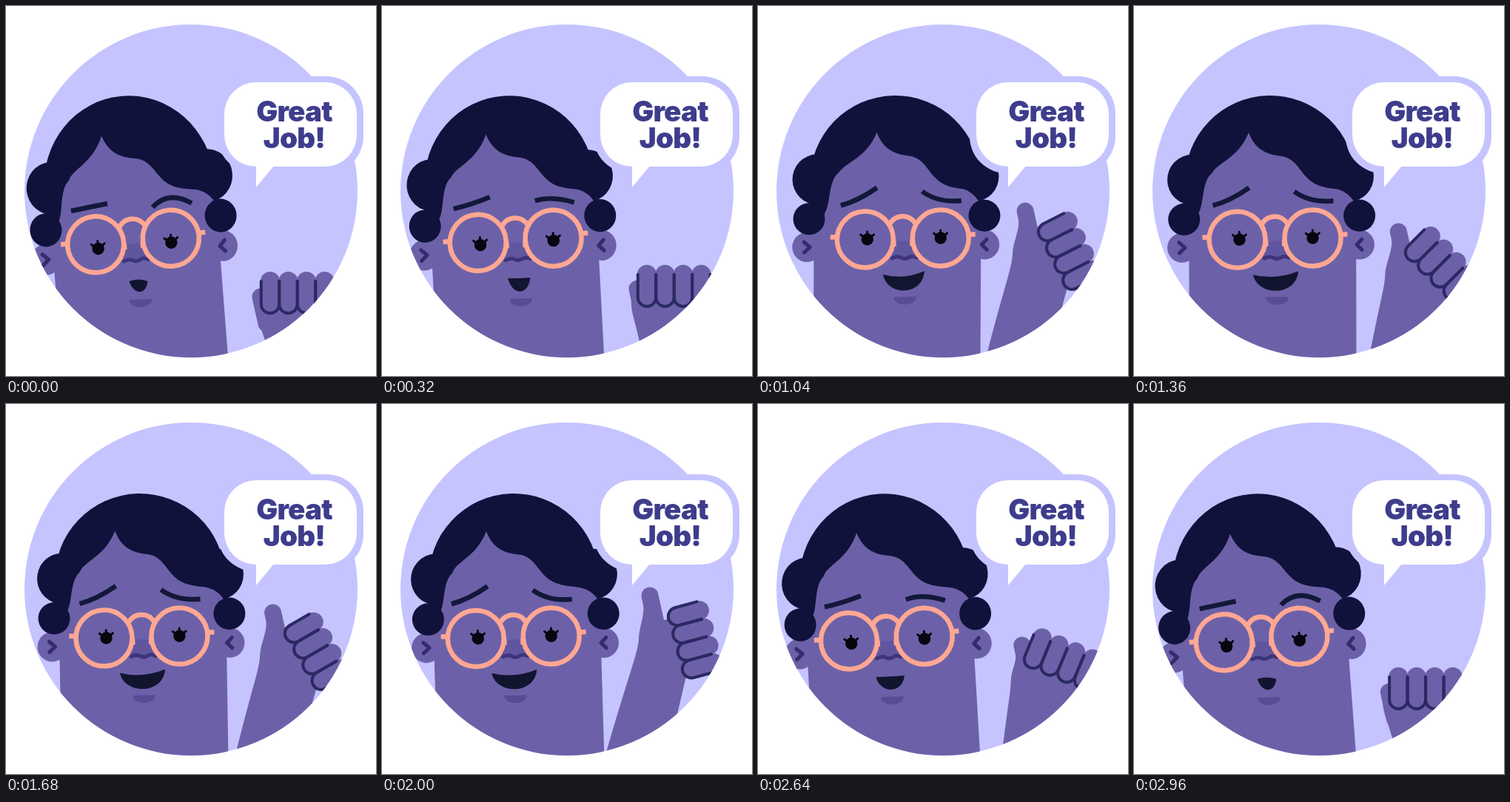
Write an HTML page that moves like this. It is 500 by 500 pixels and loops after 3.04 s.

```html
<!DOCTYPE html>
<html lang="en">
<head>
<meta charset="utf-8">
<title>Great Job!</title>
<style>
  html, body { margin: 0; width: 100%; height: 100%; overflow: hidden; background: #fff; }
  svg { display: block; width: 100%; height: 100%; }
  .lilac { fill: #c5c4ff; }
  .skin { fill: #6c61a8; }
  .hair { fill: #10123b; }
  .line { fill: none; stroke-linecap: round; stroke-linejoin: round; }
  .ear { stroke: #322d6c; stroke-width: 5; }
  .glasses { fill: none; stroke: #ffa793; stroke-width: 6.5; }
  .brow { fill: none; stroke: #13183a; stroke-width: 6.5; }
  .lash { stroke: #05060f; stroke-width: 3; }
  .limb { fill: none; stroke: #6c61a8; stroke-linecap: round; }
  .crease { stroke: #2b2963; stroke-width: 4; }
  text { font: 900 38.5px Inter, Roboto, sans-serif; letter-spacing: -.8px; fill: #3e3d8d; text-anchor: middle; }
</style>
</head>
<body>
<svg viewBox="0 0 500 500">
  <defs>
    <clipPath id="disc"><circle cx="250" cy="250" r="225"/></clipPath>
    <g id="eye">
      <circle cy="1" r="8.2" fill="#05060f"/>
      <path class="line lash" d="M0 -5V-9.5M-5 -2L-9 -5.5M5 -2L9 -5.5"/>
    </g>
    <g id="finger"><path class="limb" stroke-width="26" d="M0 0V-31"/></g>
    <path id="crease" class="line crease" d="M-12.2 -31V0A12.2 12.2 0 0 0 12.2 0V-31"/>
  </defs>

  <circle class="lilac" cx="250" cy="250" r="225"/>

  <g clip-path="url(#disc)">
    <g class="head hair">
      <ellipse cx="-1" cy="-50" rx="115" ry="114"/>
      <circle cx="-106" cy="-53" r="34"/>
      <circle cx="105" cy="-53" r="34"/>
    </g>
    <path id="neck" class="skin"/>
    <g class="head">
      <path id="forehead" class="skin"/>
      <circle class="skin" cx="-122" cy="38" r="20"/>
      <circle class="skin" cx="118" cy="39" r="20"/>
      <path class="line ear" d="M-126 31L-118 38L-126 45M121 32L114 39L121 46"/>
      <circle class="hair" cx="-118.5" r="21.5"/>
      <circle class="hair" cx="118.5" r="21.5"/>
    </g>

    <g id="face">
      <g id="specs">
        <path d="M-12 3L-16 26Q-10 22 -4 25Q2 29 8 25Q13 22 18 25L12 3Z" fill="#6056a0"/>
        <path class="line" stroke="#3d357c" stroke-width="5" d="M-15 26Q-9 23 -4 25Q2 29 8 25Q13 23 18 26"/>
        <g id="eyes"><use href="#eye" x="-48"/><use href="#eye" x="51"/></g>
        <g class="glasses">
          <circle cx="-51" r="38"/>
          <circle cx="51" r="38"/>
          <path d="M-18 -19C-10 -34 10 -34 18 -19M-98 -4H-89M89 -4H98M-12.5 2V10M12.5 2V10"/>
        </g>
      </g>
      <path id="brows" class="brow"/>
      <path id="mouth" fill="#12152f"/>
      <path id="chin" fill="#584c97" d="M-15.5 0H15.5C15 14 -15 14 -15.5 0Z"/>
    </g>

    <path id="arm" class="skin"/>
    <path id="thumb" class="limb" stroke-width="23"/>
    <g id="fist">
      <use href="#finger"/><use href="#finger" x="24.5"/><use href="#finger" x="49"/><use href="#finger" x="73.5"/>
      <use href="#crease"/><use href="#crease" x="24.5"/><use href="#crease" x="49"/><use href="#crease" x="73.5"/>
    </g>
  </g>

  <rect class="lilac" x="286" y="95" width="197" height="131" rx="50"/>
  <rect x="295" y="103" width="179" height="114" rx="43" fill="#fff"/>
  <path d="M338 212V245L362 216Z" fill="#fff"/>
  <text x="389.5" y="156">Great</text>
  <text x="389.5" y="192">Job!</text>
</svg>

<script>
const LOOP = 3040, STEP = 80;
const el = id => document.getElementById(id);
const setPath = (id, d) => el(id).setAttribute('d', d);
const setTransform = (node, value) => node.setAttribute('transform', value);
const heads = document.querySelectorAll('.head');

// Eased 0 to 1 between two times
function ramp(t, from, to) {
  const u = Math.min(1, Math.max(0, (t - from) / (to - from)));
  return u * u * (3 - 2 * u);
}

// Quadratic curve from a to c that passes through b
function arcThrough(a, b, c) {
  const ctrl = b.map((v, k) => 2 * v - (a[k] + c[k]) / 2);
  return `M${a}Q${ctrl} ${c}`;
}

function drawHead(x, y, tilt, shift) {
  const stretch = (y - 121) / 164, half = shift / 2;
  heads.forEach(g => setTransform(g, `translate(${x} ${y}) rotate(${tilt}) scale(1 ${stretch})`));
  setPath('neck', `M${x - 112} ${y}L75 480H300.5L${x + 114} ${y}Z`);
  setPath('forehead', `M${shift - 33} -115
    C${shift - 25} -92 ${shift - 10} -86 ${shift + 6} -83
    C${shift + 28} -81 ${shift + 32} -66 ${shift + 44} -53
    C${shift + 56} -39 ${half + 76} -38 ${half + 88} -36
    C100 -33 109 -26 114 -14V30H-112L${half - 101} -8
    C${half - 93} -20 ${half - 96} -50 ${half - 82} -61
    C${shift - 76} -76 ${shift - 48} -80 ${shift - 33} -115Z`);
}

function drawFace(x, y, tilt, mood, grin) {
  setTransform(el('face'), `translate(${x} ${y})`);
  setTransform(el('specs'), `rotate(${tilt})`);
  setTransform(el('eyes'), `translate(0 ${5 - 6 * mood})`);
  setTransform(el('chin'), `translate(${10 - 7 * mood} 78.5) rotate(${tilt / 2})`);
  setPath('brows',
    arcThrough([-84, -41 - 4 * mood], [-60, -46 - 8 * mood], [-35, -51 - 18 * mood]) +
    arcThrough([26, -46 - 18 * mood], [50, -59 + 6 * mood], [79, -51.5]));

  const mid = 7 - 6 * mood, half = 12.5 + 18 * grin;
  const level = 54 - 8 * mood, skew = 2.5 * grin, low = 73 + 5 * mood;
  const left = mid - half, right = mid + half;
  setPath('mouth', `M${left} ${level + skew}Q${mid} ${level + 15 * mood - 5} ${right} ${level - skew}
    C${right - 2} ${low} ${left + 6} ${low} ${left} ${level + skew}Z`);
}

function drawHand(t) {
  const lift = ramp(t, 240, 700) - ramp(t, 2240, LOOP);
  const dip = ramp(t, 800, 1360) - ramp(t, 1360, 2000);
  const curl = ramp(t, 320, 960) - ramp(t, 2080, 2960);
  const bend = curl - .4 * dip, open = Math.min(1, 2 * lift);

  const x = 357 + 12 * lift + 30 * curl - 20 * dip;
  const y = 403 - 116 * lift + 46 * dip;
  const turn = 75 * bend, a = turn * Math.PI / 180;
  const heel = [x + 75 * Math.cos(a) - 6 * Math.sin(a), y + 75 * Math.sin(a) + 6 * Math.cos(a)];
  const tip = [x - 13 - 24 * bend * bend, y - 10 - 18 * lift];
  const base = [tip[0] + 8, tip[1] + 36];
  const palm = [x - 21 - 31 * bend, y - 3 + 33 * open];
  const elbow = 357 - 55 * lift + 16 * dip;
  const inner = [elbow + .7 * (palm[0] - elbow), 475 + .7 * (palm[1] - 475)];

  setTransform(el('fist'), `translate(${x} ${y}) rotate(${turn})`);
  setPath('thumb', `M${tip}L${base}`);
  setPath('arm', `M${tip[0] - 11} ${tip[1]}
    C${tip[0] - 4} ${tip[1] + 22 * open} ${palm[0] + 1} ${palm[1] - 20} ${palm}
    C${palm[0] - 1} ${palm[1] + 20} ${inner} ${elbow} 475
    h84L${heel}L${x} ${y}L${base}L${tip}Z`);
}

function draw() {
  const t = Math.floor(performance.now() % LOOP / STEP) * STEP;
  const swing = ramp(t, 0, 900) * Math.min(1, (LOOP - t) / 1840);
  const relax = ramp(t, 2080, LOOP);
  const mood = ramp(t, 0, 720) - relax;
  const grin = ramp(t, 0, 1360) - relax;
  const lean = (swing + mood) / 2;
  // Sideways turn of the face: right, then left, then back
  const shift = 10 * ramp(t, 0, 720) - 13.5 * ramp(t, 720, 2160) + 3.5 * ramp(t, 2160, LOOP);

  const x = 172 + 15.5 * swing, tilt = -4.8 + 3.7 * lean;
  drawHead(x, 293 - 7.5 * lean, tilt, shift);
  drawFace(x + shift, 318 - 3.5 * lean, tilt, mood, grin);
  drawHand(t);
  requestAnimationFrame(draw);
}
draw();
</script>
</body>
</html>
```
